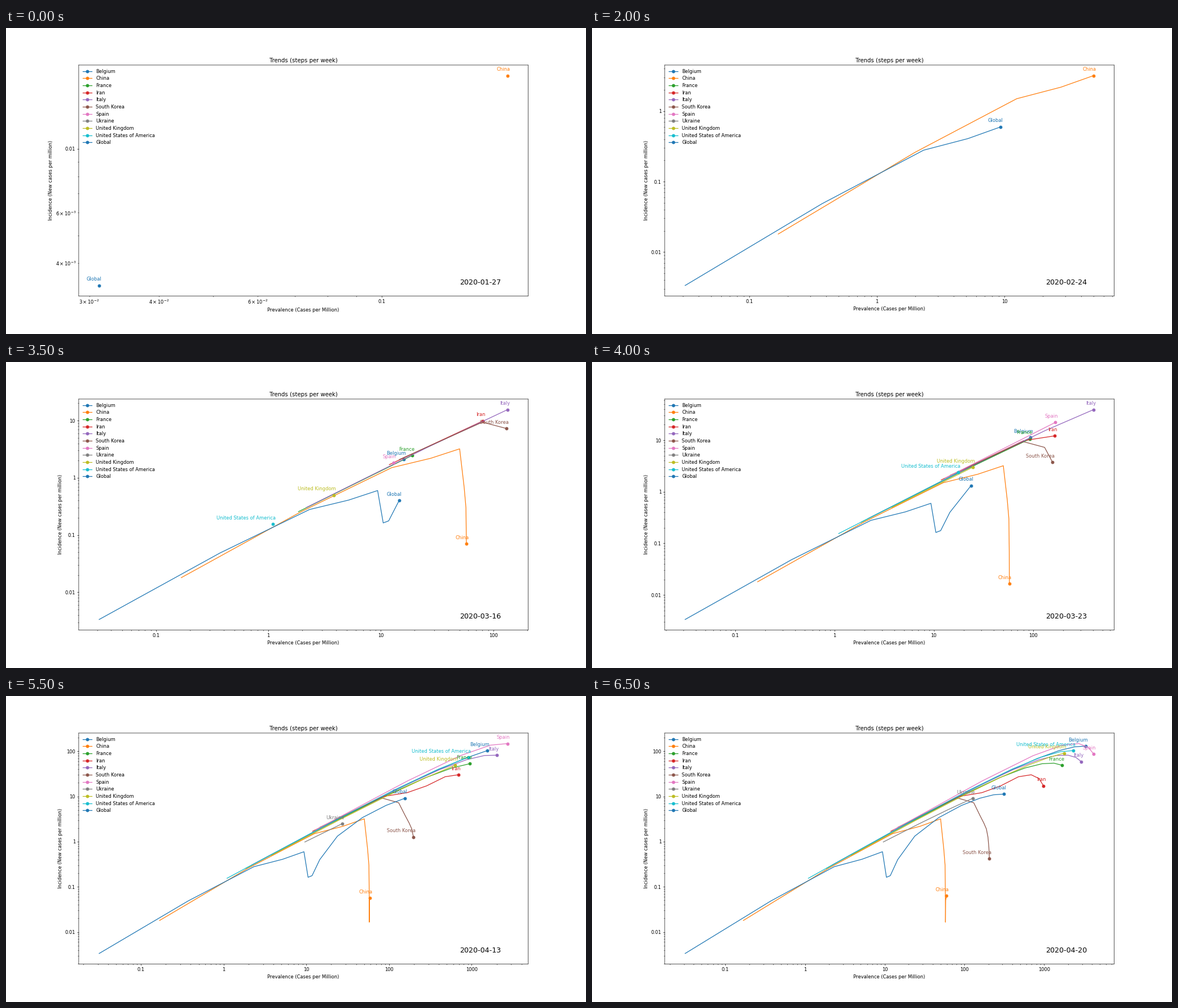
Write a matplotlib script that moves like this. It is 1028x544 px and loops after 10 s.

```python
import numpy as np
import matplotlib.pyplot as plt
from matplotlib.animation import FuncAnimation
from matplotlib.lines import Line2D

W, H = 1028, 544
DPI = W / 17
FRAMES = 20  # the last week is held
WEEKS = np.arange(-1, 14)
LAST = WEEKS[-1]
START = np.datetime64("2020-01-27")

# Outbreaks as Gompertz waves: (first week, cases per million then, final size, decay)
WAVES = {
    "Belgium": [(7, 16, 7300, 0.71)],
    "France": [(6, 1.85, 2730, 0.68)],
    "Iran": [(6, 11.9, 200, 0.325), (8, 17, 960, 0.55)],
    "Italy": [(5, 2.18, 4000, 0.672)],
    "South Korea": [(5, 14.6, 155, 0.28), (8, 10, 54, 0.52)],
    "Spain": [(7, 13, 5170, 0.572)],
    "Ukraine": [(10, 9.6, 3013, 0.82)],
    "United Kingdom": [(7, 3.8, 6740, 0.75)],
    "United States of America": [(7, 1.1, 4970, 0.67)],
}
REST_OF_WORLD = [(5, 0.25, 3, 0.5), (7, 2.2, 657, 0.72)]
CHINA_SHARE = 0.186  # of the world population
# China's daily cases per million rise, collapse and level off: (week, rate)
CHINA_RATE = [(-1, 0.006), (0, 0.018), (1, 0.26), (2, 1.5), (4, 3.2),
              (5, 0.69), (6, 0.3), (8, 0.0165), (9, 0.05), (13, 0.063)]


def wave_total(waves):
    return sum(final * (first / final) ** (decay ** (WEEKS - week))
               for week, first, final, decay in waves)


def china_total():
    week, rate = np.transpose(CHINA_RATE)
    return 7 * np.cumsum(np.exp(np.interp(WEEKS, week, np.log(rate))))


# name -> (first week shown, cumulative cases per million)
trends = {name: (waves[0][0], wave_total(waves)) for name, waves in WAVES.items()}
trends["China"] = 0, china_total()
trends = dict(sorted(trends.items()))
trends["Global"] = 0, CHINA_SHARE * trends["China"][1] + wave_total(REST_OF_WORLD)
colors = {name: f"C{i % 10}" for i, name in enumerate(trends)}

fig = plt.figure(figsize=(17, (H + 0.005) / DPI), dpi=DPI, facecolor="white")
left, right, top, bottom = 128.9, 925.4, 65.9, 476.4
ax = fig.add_axes([left / W, 1 - bottom / H, (right - left) / W, (bottom - top) / H])


def draw_trend(name, week):
    first, total = trends[name]
    if week < first:
        return
    x = total[first + 1:week + 2]
    y = np.diff(total)[first:week + 1] / 7
    ax.plot(x, y, "-o", color=colors[name], markevery=[len(x) - 1])
    ax.annotate(name, (x[-1], y[-1]), xytext=(5, 10), textcoords="offset points",
                ha="right", color=colors[name])


def draw(frame):
    week = min(frame, LAST)
    ax.clear()
    ax.set_xscale("log")
    ax.set_yscale("log")
    ax.spines[:].set_snap(False)
    for name in trends:
        draw_trend(name, week)
    for axis in (ax.xaxis, ax.yaxis):
        axis.set_major_formatter("{x:g}")
    ax.set_title("Trends (steps per week)")
    ax.set_xlabel("Prevalence (Cases per Million)")
    ax.set_ylabel("Incidence (New cases per million)")
    handles = [Line2D([], [], color=c, marker="o", label=n) for n, c in colors.items()]
    ax.legend(handles=handles, loc="upper left", frameon=False,
              labelspacing=0.435, borderaxespad=0.4)
    date = START + 7 * int(min(week, LAST - 1))
    ax.text(0.848, 0.05, str(date), transform=ax.transAxes, fontsize=15)
    return []


anim = FuncAnimation(fig, draw, frames=FRAMES, interval=500, repeat=True)
plt.show()
```
